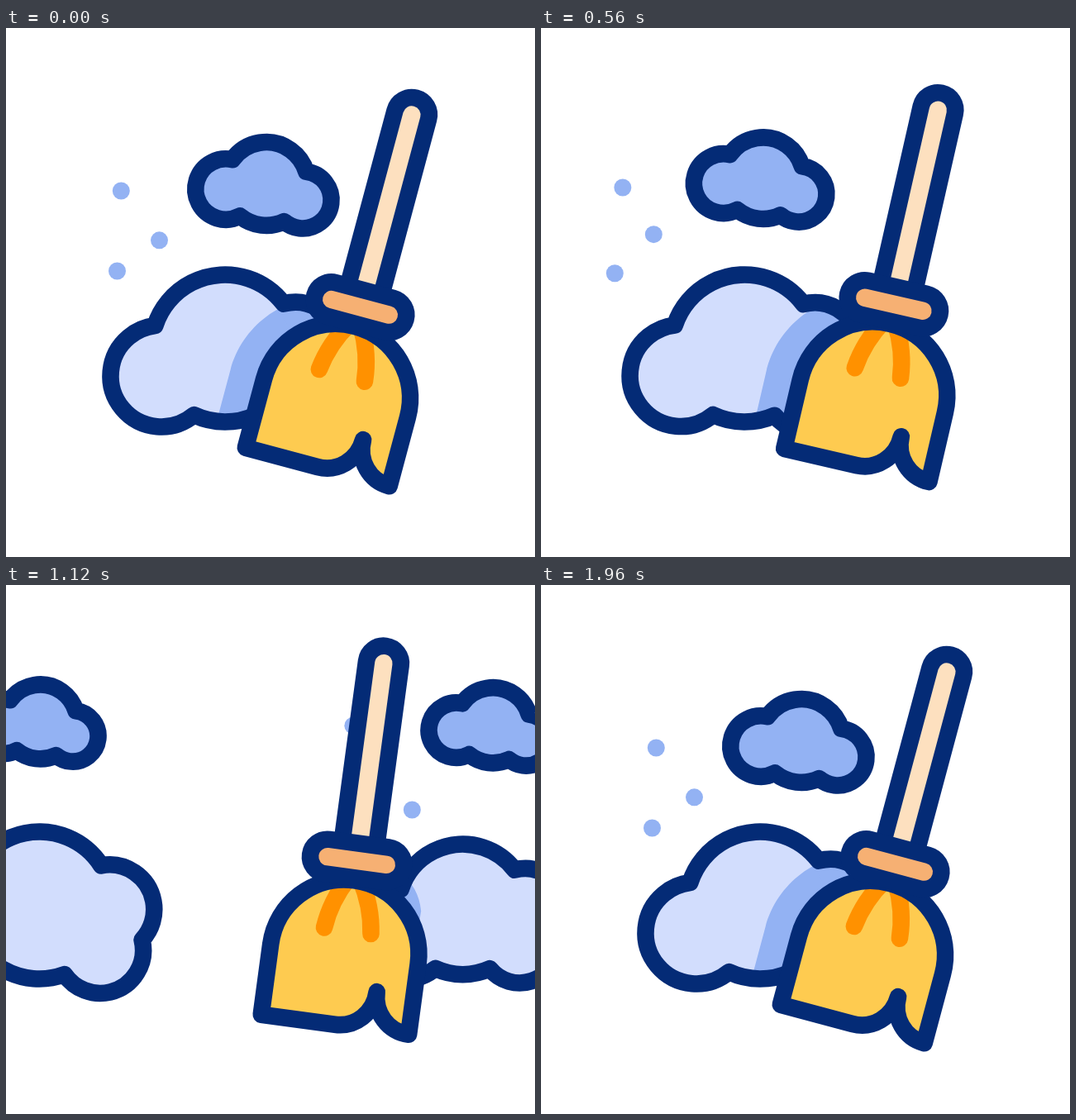
Animation, 640 px wide and 640 px high, one loop 2 s. Source, as an HTML page with a canvas:

```html
<!DOCTYPE html>
<html lang="en">
<head>
<meta charset="utf-8">
<title>Sweeping broom</title>
<style>
  html, body { margin: 0; width: 100%; height: 100%; overflow: hidden; background: #fff; }
  canvas { display: block; width: 640px; height: 640px; }
</style>
</head>
<body>
<canvas id="stage" width="640" height="640"></canvas>
<script>
const ctx = document.getElementById('stage').getContext('2d');
const LOOP = 2000, STEP = 40, LINE = 20.6;
const NAVY = '#042b76', BLUE = '#93b2f3', PALE = '#d2ddfd', YELLOW = '#fecb50',
      ORANGE = '#ff9100', PEACH = '#f6b073', CREAM = '#fde0bf';

const rad = deg => deg * Math.PI / 180;
const clamp = v => Math.max(0, Math.min(1, v));
const smooth = v => { v = clamp(v); return v * v * (3 - 2 * v); };

// Smooth curve through the keys, at rest at both ends
function spline(times, vals, t) {
  const n = times.length - 1;
  if (t <= times[0]) return vals[0];
  if (t >= times[n]) return vals[n];
  let i = 0;
  while (t > times[i + 1]) i++;
  const slope = k => (vals[k + 1] - vals[k]) / (times[k + 1] - times[k]);
  const tangent = k => k === 0 || k === n ? 0 : (slope(k - 1) + slope(k)) / 2;
  const h = times[i + 1] - times[i], u = (t - times[i]) / h, u2 = u * u, u3 = u2 * u;
  return vals[i] + (vals[i + 1] - vals[i]) * (3 * u2 - 2 * u3) +
    h * ((u3 - 2 * u2 + u) * tangent(i) + (u3 - u2) * tangent(i + 1));
}

// Cosine ease from key to key
function swing(times, vals, t) {
  const n = times.length - 1;
  if (t <= times[0]) return vals[0];
  if (t >= times[n]) return vals[n];
  let i = 0;
  while (t > times[i + 1]) i++;
  const u = (t - times[i]) / (times[i + 1] - times[i]);
  return vals[i] + (vals[i + 1] - vals[i]) * (1 - Math.cos(Math.PI * u)) / 2;
}

const OUT = [375, 720, 960, 1320, 1640];
const IN = [560, 720, 960, 1320, 1640, 1960];
const SWEEP = [120, 410, 700, 990, 1280];

function stroke(color = NAVY) {
  ctx.strokeStyle = color;
  ctx.lineWidth = LINE;
  ctx.lineJoin = ctx.lineCap = 'round';
  ctx.stroke();
}
function fill(color) {
  ctx.fillStyle = color;
  ctx.fill();
}

/* ---------- clouds ---------- */

// Circles as x, y, radius, walked clockwise along the outline
const PUFF = { x: 311.5, y: 190.5, circles: [[-45.5, 4.5, 36.7], [3.5, -2, 50.4], [47.5, 17.5, 34.5]],
  order: [0, 1, 2, 1] };
const BANK = { x: 265, y: 387.5, circles: [[-77, 33.5, 61.5], [0, 0, 89], [85, -1.8, 54], [77.5, 48.3, 52.2]],
  order: [0, 1, 2, 3, 1] };

function meet([ax, ay, ar], [bx, by, br]) {
  const d = Math.hypot(bx - ax, by - ay), ux = (bx - ax) / d, uy = (by - ay) / d;
  const a = (d * d + ar * ar - br * br) / (2 * d), h = Math.sqrt(ar * ar - a * a);
  return [ax + ux * a + uy * h, ay + uy * a - ux * h];
}

function cloudPath(cloud, dx, dy, scale, turn = 0) {
  const c = Math.cos(turn) * scale, s = Math.sin(turn) * scale;
  const world = cloud.circles.map(([x, y, r]) =>
    [cloud.x + dx + x * c - y * s, cloud.y + dy + x * s + y * c, r * scale]);
  const ring = cloud.order.map(i => world[i]), n = ring.length;
  const joints = ring.map((circle, i) => meet(circle, ring[(i + 1) % n]));
  ctx.beginPath();
  ring.forEach(([x, y, r], i) => {
    const p = joints[(i + n - 1) % n], q = joints[i];
    ctx.arc(x, y, r, Math.atan2(p[1] - y, p[0] - x), Math.atan2(q[1] - y, q[0] - x));
  });
  ctx.closePath();
}

function puff(dx, dy, scale) {
  cloudPath(PUFF, dx, dy, scale);
  fill(BLUE);
  stroke();
}

function bank(broom, dx, dy, scale, turn) {
  cloudPath(BANK, dx, dy, scale, turn);
  fill(PALE);
  ctx.save();
  ctx.clip();
  place(broom);
  shade(broom.bend);
  ctx.restore();
  cloudPath(BANK, dx, dy, scale, turn);
  stroke();
}

/* ---------- dots ---------- */

const DOTS = [
  { x: 139.3, y: 197, out: [-102, -10], rate: 1, rise: [-26, -29, -33, -16, -4, 0] },
  { x: 185.5, y: 256.8, out: [-124, -18], rate: 1.09, rise: [16, 18, 19, 9, 2, 0] },
  { x: 134.5, y: 294, out: [-114, 7], rate: 0.975, rise: [6, 12, 22, 10, 2, 0] }
];

function dot(x, y) {
  ctx.beginPath();
  ctx.arc(x, y, 10.5, 0, 7);
  fill(BLUE);
}

function dots(t) {
  const gone = spline(OUT, [0, 1, 1.95, 3.3, 5], t);
  const left = spline(IN, [540, 466, 363, 177, 43, 0], t);
  for (const d of DOTS) {
    if (t < 1640) dot(d.x + d.out[0] * gone, d.y + d.out[1] * gone);
    if (t > 560) dot(d.x + d.rate * left, d.y + spline(IN, d.rise, t));
  }
}

/* ---------- broom: origin at the middle of the collar ---------- */

function place({ x, y, angle }) {
  ctx.translate(x, y);
  ctx.rotate(angle);
  ctx.translate(0, -170);
}

// Bristles lean sideways, more towards the tips
const leaner = bend => (x, y) => [x + 16 * bend * smooth((y - 40) / 140), y];

function shade(bend) {
  const p = leaner(bend);
  ctx.beginPath();
  ctx.moveTo(...p(-132, 270));
  ctx.lineTo(...p(-132, 200));
  ctx.lineTo(...p(-132, 114));
  ctx.bezierCurveTo(...p(-132, 48), ...p(-78, -6), ...p(-12, -6));
  ctx.bezierCurveTo(...p(30, -6), ...p(75, 5), ...p(85, 50));
  ctx.lineTo(...p(80, 200));
  ctx.lineTo(...p(0, 270));
  ctx.closePath();
  fill(BLUE);
  ctx.beginPath();
  ctx.roundRect(-98, -62, 150, 124, 62);
  fill(BLUE);
}

function headPath(bend) {
  const p = leaner(bend), lag = Math.max(0, -bend), k = 0.5523;
  const r = 90 * k, q = 45 * k;
  // The side the bristles lean towards stretches out straight
  const shoulder = side => side * bend > 0
    ? { base: [side * 90 + 1.5 * bend, 114], top: [side * 90 - 5 * bend, 114 - r] }
    : { base: p(side * 90, 114), top: p(side * 90, 114 - r) };
  const left = shoulder(-1), right = shoulder(1);
  ctx.beginPath();
  ctx.moveTo(...p(-90 + 4 * lag, 200 - 6 * lag));
  ctx.lineTo(...left.base);
  ctx.bezierCurveTo(...left.top, -r, 24, 0, 24);
  ctx.bezierCurveTo(r, 24, ...right.top, ...right.base);
  ctx.lineTo(...p(90, 200));
  ctx.bezierCurveTo(...p(90 - q, 200), ...p(45, 155 + q), ...p(45, 154));
  ctx.bezierCurveTo(...p(45, 155 + q), ...p(q, 200), ...p(0, 200));
  ctx.closePath();
}

function strand(side, bend) {
  const lead = side * bend < 0 ? 10 : 3;
  const shift = bend * (4 + lead);
  ctx.beginPath();
  ctx.moveTo(side * 28.5 + shift, 85.5);
  ctx.quadraticCurveTo(side * 25 + shift / 2, 52, side * 7, 22);
  stroke(ORANGE);
}

function drawBroom(broom) {
  ctx.save();
  place(broom);

  ctx.beginPath();
  ctx.moveTo(-21, -10);
  ctx.lineTo(-21, -241);
  ctx.arc(0, -241, 21, Math.PI, 0);
  ctx.lineTo(21, -10);
  ctx.closePath();
  fill(CREAM);
  stroke();

  headPath(broom.bend);
  fill(YELLOW);
  strand(-1, broom.bend);
  strand(1, broom.bend);
  headPath(broom.bend);
  stroke();

  ctx.beginPath();
  ctx.roundRect(-57, -21, 114, 42, 21);
  fill(PEACH);
  stroke();
  ctx.restore();
}

/* ---------- scene ---------- */

function draw(t) {
  const broom = {
    x: swing(SWEEP, [384.5, 444.5, 339.5, 414.5, 384.5], t),
    y: swing(SWEEP, [502, 501, 499.2, 502, 502], t),
    angle: rad(swing(SWEEP, [15, 1, 23.4, 2.4, 15], t)),
    bend: swing(SWEEP, [0, 1, -1, 0, 0], t)
  };
  ctx.fillStyle = '#fff';
  ctx.fillRect(0, 0, 640, 640);
  dots(t);

  if (t < 1640) {
    puff(spline(OUT, [0, -114, -211.5, -355, -520], t),
         spline(OUT, [0, -15.5, -23.5, -19.5, -8], t),
         spline(OUT, [1, 0.945, 0.9, 0.9, 0.95], t));
    const dx = spline(OUT, [0, -57, -152, -322, -490], t);
    bank(broom, dx, 0, 1, rad(-0.02 * dx));
  }
  if (t > 560) {
    puff(spline(IN, [560, 480, 359.5, 172, 41.5, 0], t),
         spline(IN, [-22, -23, -23.5, -11.5, -3, 0], t),
         spline(IN, [0.88, 0.88, 0.9, 0.915, 0.98, 1], t));
    const scale = spline(IN, [0.79, 0.81, 0.86, 0.916, 0.97, 1], t);
    bank(broom, spline(IN, [540, 467, 361, 197, 62.7, 0], t), 43 * (1 - scale), scale, 0);
  }
  drawBroom(broom);
}

function tick() {
  const t = performance.now() % LOOP;
  draw(Math.floor(t / STEP) * STEP);
  requestAnimationFrame(tick);
}
tick();
</script>
</body>
</html>
```
